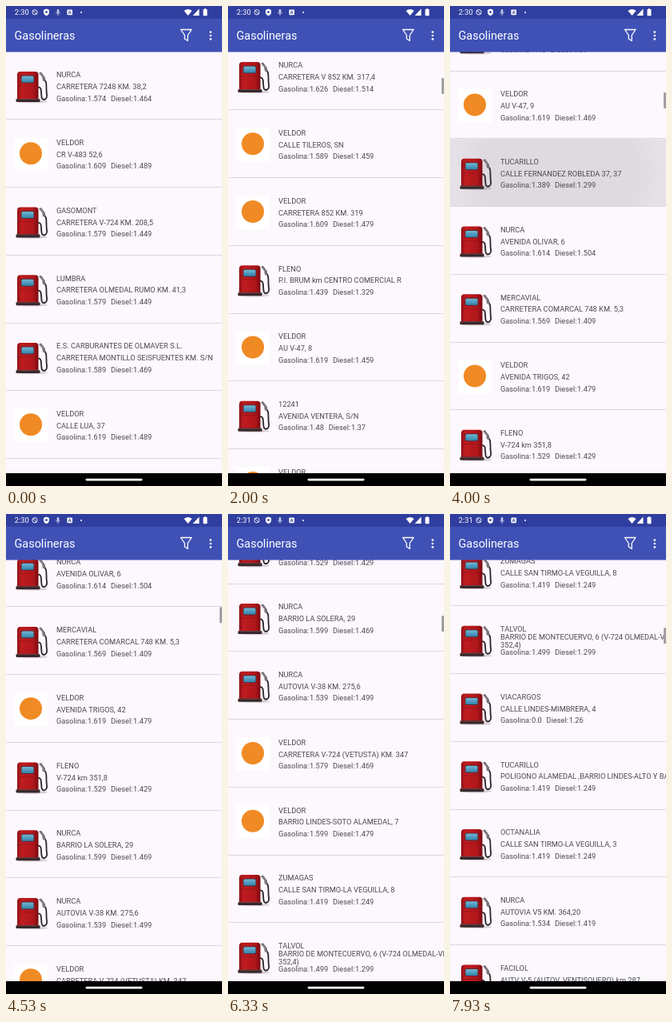
An HTML page with a canvas that plays this animation: 270x600 px, repeating every 8000 ms.

```html
<!DOCTYPE html>
<html lang="es">
<head>
<meta charset="utf-8">
<title>Gasolineras</title>
<style>
html, body { margin: 0; width: 100%; height: 100%; overflow: hidden; background: #fdf7fe; }
canvas { display: block; width: 270px; height: 600px; }
</style>
</head>
<body>
<canvas id="stage"></canvas>
<script>
const W = 270, H = 600, LOOP = 8000;
const TOP = 57.5, BOTTOM = 584, ROW = 84.75;
const LOGO_BRAND = 'VELDOR';

// name | address (~ breaks the line) | petrol | diesel
const stations = `NURCA|CARRETERA 7248 KM. 38,2|1.574|1.464
VELDOR|CR V-483 52,6|1.609|1.489
GASOMONT|CARRETERA V-724 KM. 208,5|1.579|1.449
LUMBRA|CARRETERA OLMEDAL RUMO KM. 41,3|1.579|1.449
E.S. CARBURANTES DE OLMAVER S.L.|CARRETERA MONTILLO SEISFUENTES KM. S/N|1.589|1.469
VELDOR|CALLE LUA, 37|1.619|1.489
NURCA|CALLE DEL TRIGAL, 18|1.604|1.494
VELDOR|CARRETERA V-52 KM. 17|1.599|1.469
FLENO|AVENIDA JUNCAL, 31|1.539|1.429
VELDOR|BARRIO LA ENCINILLA, 5|1.609|1.479
NURCA|CARRETERA V 852 KM. 317,4|1.626|1.514
VELDOR|CALLE TILEROS, SN|1.589|1.459
VELDOR|CARRETERA 852 KM. 319|1.609|1.479
FLENO|P.I. BRUM km CENTRO COMERCIAL R|1.439|1.329
VELDOR|AU V-47, 8|1.619|1.459
12241|AVENIDA VENTERA, S/N|1.48|1.37
VELDOR|AU V-47, 9|1.619|1.469
TUCARILLO|CALLE FERNANDEZ ROBLEDA 37, 37|1.389|1.299
NURCA|AVENIDA OLIVAR, 6|1.614|1.504
MERCAVIAL|CARRETERA COMARCAL 748 KM. 5,3|1.569|1.409
VELDOR|AVENIDA TRIGOS, 42|1.619|1.479
FLENO|V-724 km 351,8|1.529|1.429
NURCA|BARRIO LA SOLERA, 29|1.599|1.469
NURCA|AUTOVIA V-38 KM. 275,6|1.539|1.499
VELDOR|CARRETERA V-724 (VETUSTA) KM. 347|1.579|1.469
VELDOR|BARRIO LINDES-SOTO ALAMEDAL, 7|1.599|1.479
ZUMAGAS|CALLE SAN TIRMO-LA VEGUILLA, 8|1.419|1.249
TALVOL|BARRIO DE MONTECUERVO, 6 (V-724 OLMEDAL-VENTAMAR~352,4)|1.499|1.299
VIACARGOS|CALLE LINDES-MIMBRERA, 4|0.0|1.26
TUCARILLO|POLIGONO ALAMEDAL ,BARRIO LINDES-ALTO Y BAJO|1.419|1.249
OCTANALIA|CALLE SAN TIRMO-LA VEGUILLA, 3|1.419|1.249
NURCA|AUTOVIA V5 KM. 364,20|1.534|1.419
FACILOL|AUTV V-5 (AUTOV. VENTISQUERO) km 287|1.489|1.379
VELDOR|AVENIDA ROBLES, 14|1.599|1.469`.split('\n').map(line => {
  const [name, address, petrol, diesel] = line.split('|');
  return { name, address: address.split('~'), petrol, diesel };
});

// Each swipe: start time, duration, offset reached
const swipes = [
  [950, 1000, 859.5],
  [2250, 885, 1332],
  [4050, 900, 1612],
  [5455, 840, 1834.5],
  [6750, 1000, 2230.5]
];
const BAR_LEAD = 100;

// Row, touch time, release time, strength
const presses = [
  [17, 3620, 4030, 1],
  [21, 5080, 5420, 0.85]
];

const canvas = document.getElementById('stage');
const ctx = canvas.getContext('2d');
const dpr = window.devicePixelRatio || 1;
canvas.width = W * dpr;
canvas.height = H * dpr;

const clamp = v => Math.max(0, Math.min(1, v));
const easeOut = p => 1 - (1 - p) ** 2;

function scrollAt(t) {
  let y = 0;
  for (const [start, span, end] of swipes) {
    y += (end - y) * easeOut(clamp((t - start) / span));
    if (t < start + span) break;
  }
  return y;
}

function barAlpha(t) {
  const shown = swipes.filter(s => t >= s[0] - BAR_LEAD).pop();
  return shown ? 1 - clamp((t - shown[0] - shown[1] - 300) / 250) : 0;
}

function rect(x, y, w, h, color) {
  ctx.fillStyle = color;
  ctx.fillRect(x, y, w, h);
}

function round(x, y, w, h, r, color) {
  ctx.fillStyle = color;
  ctx.beginPath();
  ctx.roundRect(x, y, w, h, r);
  ctx.fill();
}

function dot(x, y, r, color) {
  ctx.fillStyle = color;
  ctx.beginPath();
  ctx.arc(x, y, r, 0, Math.PI * 2);
  ctx.fill();
}

function shape(d, color, line) {
  const path = new Path2D(d);
  if (line) {
    ctx.strokeStyle = color;
    ctx.lineWidth = line;
    ctx.stroke(path);
  } else {
    ctx.fillStyle = color;
    ctx.fill(path);
  }
}

// Draws text and returns the x where it ends
function text(s, x, y, size = 9.25, color = '#4c494f') {
  ctx.font = `${size}px Roboto, sans-serif`;
  ctx.fillStyle = color;
  ctx.fillText(s, x, y);
  return x + ctx.measureText(s).width;
}

function drawPump(y) {
  ctx.save();
  ctx.translate(0, y);
  ctx.lineCap = ctx.lineJoin = 'round';
  ctx.fillStyle = 'rgba(70,60,70,.22)';
  ctx.beginPath();
  ctx.ellipse(33, 62, 19, 1.8, 0, 0, Math.PI * 2);
  ctx.fill();
  shape('M40 44 C46 43 43 54 45 58 C47 61 52 59 51 53 C50 47 51 43 50 38 L47 32', '#2b2729', 1.8);
  shape('M41 26 L44 25 L49 32 L49 37 L46 36 L45 31 Z', '#777276');
  shape('M42 27 L46 32', '#aaa5a8', 1);
  const red = ctx.createLinearGradient(14, 0, 41, 0);
  red.addColorStop(0, '#8d1218');
  red.addColorStop(0.2, '#c01c20');
  red.addColorStop(0.75, '#ae161a');
  red.addColorStop(1, '#74090e');
  round(14, 24.5, 26.5, 35, [4, 4, 1, 1], red);
  round(18.5, 29, 17, 10, 2, '#5d2830');
  const glass = ctx.createLinearGradient(0, 30, 0, 38);
  glass.addColorStop(0, '#72b6d2');
  glass.addColorStop(1, '#3283ad');
  round(19.5, 30, 15, 8, 1.5, glass);
  rect(16, 42, 22, 0.7, '#951218');
  round(12.5, 58.5, 30, 4, 1, '#38272a');
  rect(13, 58.5, 29, 1, '#654348');
  ctx.restore();
}

function drawRipple(i, y, t) {
  for (const [row, down, up, strength] of presses) {
    if (row !== i || t < down || t > up + 220) continue;
    const r = 30 + 100 * easeOut(clamp((t - down) / 420));
    const glow = ctx.createRadialGradient(135, y + ROW / 2, r * 0.75, 135, y + ROW / 2, r);
    glow.addColorStop(0, '#dfdadf');
    glow.addColorStop(1, '#e6e1e6');
    ctx.save();
    ctx.globalAlpha = strength * clamp((t - down) / 100) * (1 - clamp((t - up) / 220));
    rect(0, y, W, ROW, glow);
    ctx.restore();
  }
}

function drawRow(s, i, y, t) {
  drawRipple(i, y, t);
  if (s.name === LOGO_BRAND) {
    rect(10.5, y + 22, 41.5, 42, '#fff');
    dot(31, y + 42, 14, '#f08a24');
  } else {
    drawPump(y);
  }
  text(s.name, 63, y + 31.8);
  const first = s.address.length > 1 ? 41.5 : 46.6;
  s.address.forEach((part, n) => text(part, 63, y + first + n * 10.6));
  let x = text('Gasolina:', 63, y + 61.2);
  x = text(s.petrol, x + 0.7, y + 61.2);
  x = text('Diesel:', x + 5.8, y + 61.2);
  text(s.diesel, x + 0.7, y + 61.2);
  rect(0, Math.round(y + ROW) - 1, W, 1, '#ddd7de');
}

function drawStatusBar(t) {
  rect(0, 0, W, 16, '#303f9f');
  text(t < 4700 ? '2:30' : '2:31', 10.8, 11.3, 9.25, '#fff');
  ctx.strokeStyle = '#fff';
  ctx.lineWidth = 0.9;
  ctx.beginPath();
  ctx.arc(36, 7.8, 3.1, 0, Math.PI * 2);
  ctx.moveTo(33.6, 5.4);
  ctx.lineTo(38.4, 10.2);
  ctx.stroke();
  shape('M50.5 3.5 L54 5 V8 Q54 10.8 50.5 12.3 Q47 10.8 47 8 V5 Z', '#fff');
  dot(50.5, 7.6, 1.4, '#303f9f');
  round(63.8, 4, 2.4, 5, 1.2, '#cdd2ef');
  shape('M62.6 7.5 Q62.8 10 65 10 Q67.2 10 67.4 7.5 M65 10 V12', '#cdd2ef', 0.8);
  round(76.4, 4.6, 6.6, 6.6, 1, '#fff');
  shape('M78 10 L79.7 5.8 L81.4 10 M78.7 8.7 H80.7', '#303f9f', 0.8);
  dot(94, 8, 1, '#fff');
  shape('M222.5 6 Q227.5 1.8 232.5 6 L227.5 12 Z', '#fff');
  shape('M241.5 3.5 V12 H233.5 Z', '#fff');
  round(246.5, 4, 5, 8.2, 0.8, '#fff');
  rect(248, 3.2, 2, 1, '#fff');
}

function drawAppBar() {
  rect(0, 15.5, W, TOP - 15.5, '#3f51b5');
  text('Gasolineras', 10.5, 42, 14.45, '#fff');
  ctx.lineJoin = 'round';
  shape('M218.5 29.5 H232 L227.2 36.5 V43.5 L223.3 41 V36.5 Z', '#fff', 1.3);
  for (const y of [32.6, 37, 41.4]) dot(255.8, y, 1.35, '#fff');
}

function draw(t) {
  ctx.setTransform(dpr, 0, 0, dpr, 0, 0);
  rect(0, 0, W, H, '#fdf7fe');
  const offset = scrollAt(t);
  stations.forEach((s, i) => {
    const y = TOP + i * ROW - offset;
    if (y > TOP - ROW && y < BOTTOM) drawRow(s, i, y, t);
  });
  ctx.globalAlpha = barAlpha(t);
  rect(267, TOP + offset / 26.3, 3, 19.7, '#a29da3');
  ctx.globalAlpha = 1;
  drawAppBar();
  drawStatusBar(t);
  rect(0, BOTTOM, W, H - BOTTOM, '#000');
  round(99.5, 590.8, 71, 2.6, 1.3, '#fff');
}

const begin = performance.now();
function frame() {
  draw((performance.now() - begin) % LOOP);
  requestAnimationFrame(frame);
}
frame();
</script>
</body>
</html>
```
